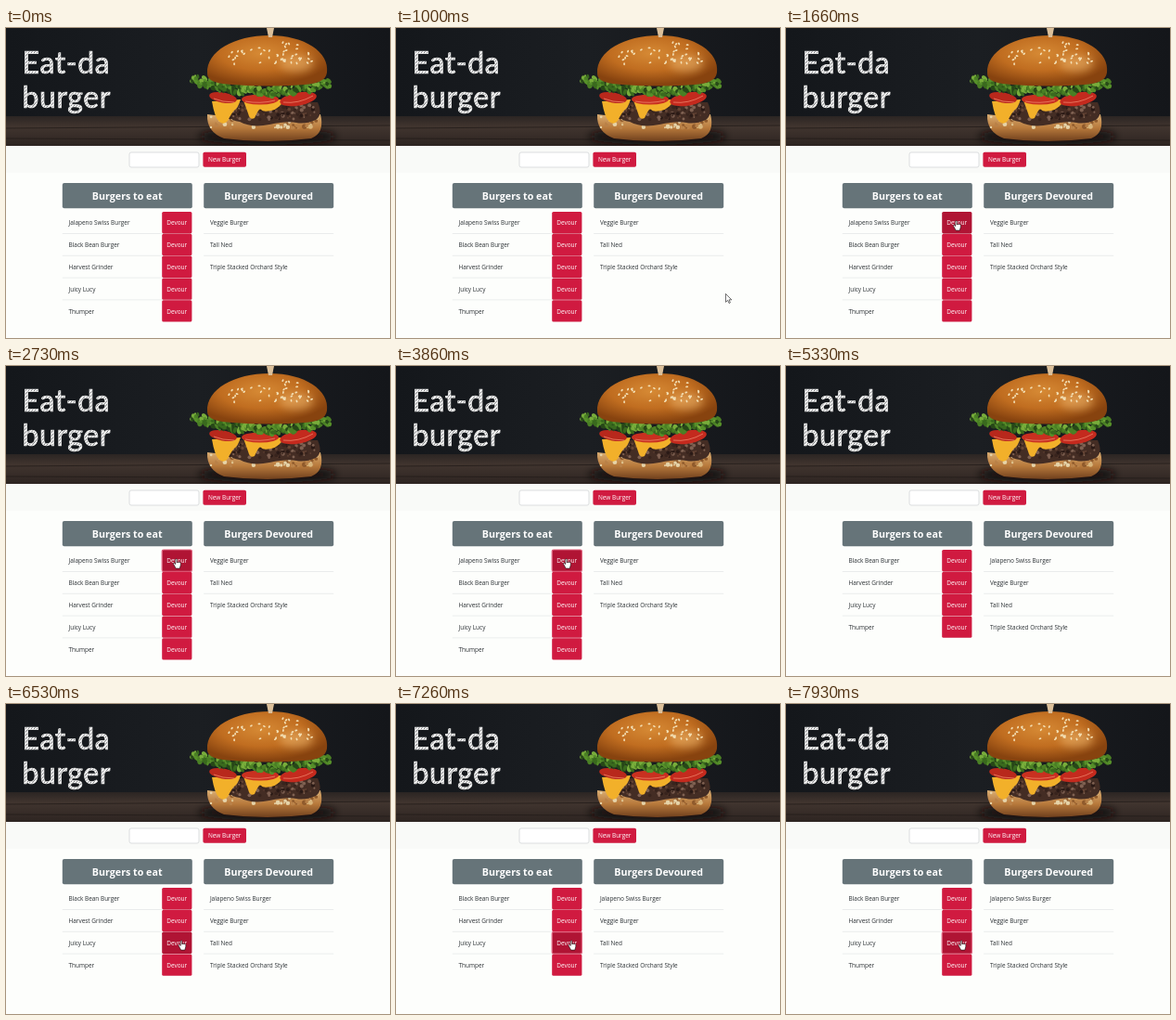
An HTML page for the animation above (8000 ms loop, 414x334 px).

```html
<!DOCTYPE html>
<html lang="en">
<head>
<meta charset="utf-8">
<title>Eat-da burger</title>
<style>
html, body { margin: 0; width: 100%; height: 100%; overflow: hidden; background: #fdfefc; }
svg { display: block; width: 414px; height: 334px; }
text { font: 6.45px "Open Sans", "Noto Sans", sans-serif; fill: #2b3034; }
.light { fill: #fff; text-anchor: middle; }
.head { font-size: 10.7px; font-weight: 700; }
.title { font: 400 32px Lato, sans-serif; fill: url(#hatch); stroke: #f4f4f2; stroke-width: .7; letter-spacing: .6px; }
</style>
</head>
<body>
<svg viewBox="0 0 414 334">
  <defs>
    <linearGradient id="wall"><stop stop-color="#14171b"/><stop offset=".5" stop-color="#1b1e22"/><stop offset="1" stop-color="#14161a"/></linearGradient>
    <linearGradient id="table" x2="0" y2="1"><stop stop-color="#2b2523"/><stop offset=".35" stop-color="#41352f"/><stop offset="1" stop-color="#2d2421"/></linearGradient>
    <radialGradient id="bun" cx=".45" cy=".35" r=".62"><stop stop-color="#d68a35"/><stop offset=".55" stop-color="#c06d20"/><stop offset="1" stop-color="#87430f"/></radialGradient>
    <linearGradient id="base" x2="0" y2="1"><stop stop-color="#d9ad72"/><stop offset=".5" stop-color="#b87a3c"/><stop offset="1" stop-color="#70401d"/></linearGradient>
    <pattern id="hatch" width="2.4" height="2.4" patternUnits="userSpaceOnUse" patternTransform="rotate(40)"><path fill="#4a4c4f" d="M0 0h3v3H0z"/><path fill="#fff" d="M0 0h1.8v3H0z"/></pattern>
    <filter id="soft" x="-30%" y="-60%" width="160%" height="220%"><feGaussianBlur stdDeviation="4"/></filter>
    <clipPath id="photo"><path d="M0 0h414v127H0z"/></clipPath>
  </defs>
  <g clip-path="url(#photo)">
    <path fill="url(#wall)" d="M0 0h414v127H0z"/>
    <path fill="url(#table)" d="M0 95h414v32H0z"/>
    <path stroke="#231c1a" stroke-width=".8" d="M0 108l414-3M0 119l414 2"/>
    <ellipse cx="282" cy="117" rx="74" ry="9" fill="#120d0c" filter="url(#soft)"/>
    <path fill="url(#base)" d="M217 93q60 8 122 0q5 20-10 26q-48 6-94 0q-19-7-18-26z"/>
    <g id="sauce"></g>
    <path fill="#442d24" d="M238 80h98q6 13-2 19-11 5-21 3t-29 2-32-3q-18-2-14-21z"/>
    <g id="crumbs"></g>
    <path fill="#f2b02a" d="M222 79l31-2q-3 9-6 11t-8 12q-4 5-9 1t-8-22zM256 78l44-1q-5 10-14 12t-11-1-7 9q-5 3-7-5z"/>
    <ellipse cx="234" cy="75" rx="15" ry="5.5" fill="#b8281c" transform="rotate(10 234 75)"/>
    <ellipse cx="274" cy="77" rx="20" ry="5.5" fill="#c93020"/>
    <ellipse cx="315" cy="76.5" rx="20" ry="7" fill="#c42a1e" transform="rotate(-10 315 76)"/>
    <path fill="none" stroke="#e5715a" d="M224 76q9 4 22 4M258 79q16 3 32-1M299 80q16 2 32-7"/>
    <g id="lettuce"></g>
    <path fill="url(#bun)" d="M217 49C216 25 246 8 284 8s65 18 62 40c-1 9-11 12-24 13q-38 3-78 0c-15-1-27-3-27-12z"/>
    <ellipse cx="313" cy="38" rx="18" ry="9" fill="#e9b067" opacity=".6" filter="url(#soft)"/>
    <path fill="#dcc09a" d="M281 0h8l-2 10h-4z"/>
    <g id="seeds"></g>
    <text class="title" x="17.5" y="48.5">Eat-da</text>
    <text class="title" x="17.5" y="86">burger</text>
  </g>
  <path fill="#f9faf8" d="M0 127h414v29H0z"/>
  <rect x="133" y="134" width="75" height="16" rx="2" fill="#fff" stroke="#d3d6d8" stroke-width=".8"/>
  <rect x="212.4" y="133.7" width="46.6" height="16" rx="1.8" fill="#d01a40"/>
  <text class="light" x="235.7" y="144.4">New Burger</text>
  <g fill="#667479"><rect x="60.8" y="167" width="140" height="27.3" rx="2"/><rect x="213.2" y="167" width="140" height="27.3" rx="2"/></g>
  <text class="light head" x="130.7" y="185.3">Burgers to eat</text>
  <text class="light head" x="283.2" y="185.3">Burgers Devoured</text>
  <g id="lists"></g>
  <g id="pointer"></g>
</svg>
<script>
const byId = id => document.getElementById(id);
let seed = 7;
const random = () => (seed = seed * 16807 % 2147483647) / 2147483647;
const repeat = (count, make) => Array.from({ length: count }, (_, i) => make(i)).join('');
const pick = list => list[Math.floor(random() * list.length)];

function scatter(count, x, y, w, h, size, colors) {
  return repeat(count, () =>
    `<circle cx="${x + random() * w}" cy="${y + random() * h}" r="${.6 + random() * size}" fill="${pick(colors)}"/>`);
}
byId('sauce').innerHTML = scatter(110, 221, 94, 114, 14, 2, ['#e6d3a8', '#d8b67c', '#b98148', '#8f5a2c']);
byId('crumbs').innerHTML = scatter(100, 240, 83, 94, 16, 1.5, ['#2a1a16', '#654535', '#7f6152', '#38241d']);
byId('lettuce').innerHTML = repeat(150, i => {
  const x = 200 + i;
  const y = 68 - ((x - 282) / 82) ** 2 * 14 + (random() - .5) * 9;
  const color = pick(['#3a6a1e', '#568f2a', '#78ad3b', '#274818', '#4a7f25']);
  return `<ellipse rx="${2 + random() * 2.5}" ry="${1.2 + random() * 1.8}" fill="${color}" transform="translate(${x} ${y}) rotate(${random() * 120})"/>`;
});
byId('seeds').innerHTML = repeat(48, () => {
  const angle = Math.PI * (1 + random()), r = Math.sqrt(random());
  const x = 283 + Math.cos(angle) * 50 * r, y = 39 + Math.sin(angle) * 27 * r;
  return `<ellipse rx="1.5" ry=".9" fill="#f3dfb4" transform="translate(${x} ${y}) rotate(${random() * 180})"/>`;
});

const TOP = 198, ROW = 23.8;
const toEat = ['Jalapeno Swiss Burger', 'Black Bean Burger', 'Harvest Grinder', 'Juicy Lucy', 'Thumper'];
const devoured = ['Veggie Burger', 'Tall Ned', 'Triple Stacked Orchard Style'];
const RELOAD = 5200;

// Pointer legs: start, end, from, to
const legs = [
  [730, 1530, [418, 315], [183.5, 207.5]],
  [4800, 5250, [183.5, 207.5], [418, 250]],
  [5660, 6460, [418, 268], [189, 254.5]],
];

function pointerAt(t) {
  const leg = legs.filter(l => t >= l[0]).pop();
  if (!leg) return [420, 315];
  const [start, end, from, to] = leg;
  const p = Math.min(1, (t - start) / (end - start));
  const eased = p * p * (3 - 2 * p);
  return from.map((v, i) => v + (to[i] - v) * eased);
}

function column(names, x, button) {
  return names.map((name, i) => {
    const y = TOP + i * ROW;
    const line = i < names.length - 1
      ? `<path stroke="#e3e5e6" stroke-width=".7" d="M${x} ${y + ROW - .3}h140"/>` : '';
    return `${line}<text x="${x + 6.7}" y="${y + 14.3}">${name}</text>${button ? button(i, y) : ''}`;
  }).join('');
}

const arrow = '<path fill="#fff" stroke="#111" stroke-width=".6" d="M0 0v9l2.1-2 1.5 3.2 1.3-.6-1.4-3.1h2.8z"/>';
const hand = '<path fill="#fff" stroke="#111" stroke-width=".6" d="M1.3 1v5L.2 5c-.9-.5-1.5.4-1 1l2.4 4.6h4.2l1-3.7V4.7c-.2-.9-1.2-.9-1.4-.2-.2-.8-1.1-.8-1.3-.1-.2-.7-1.1-.7-1.3 0V1C2.8 0 1.3 0 1.3 1z"/>';

function draw(t) {
  const [px, py] = pointerAt(t);
  const reloaded = t >= RELOAD;
  const focused = t >= 6800 ? 2 : t >= 2000 && !reloaded ? 0 : -1;
  let hovering = false;

  const button = (i, y) => {
    const over = px > 168 && px < 201 && py > y && py < y + ROW;
    hovering = hovering || over;
    const ring = i === focused ? 'stroke="#df6680" stroke-width="1.2"' : '';
    return `<rect x="168.2" y="${y}" width="32.2" height="23.4" rx="1.6" fill="${over ? '#b01434' : '#d01a40'}" ${ring}/>` +
      `<text class="light" x="184.2" y="${y + 14.3}">Devour</text>`;
  };
  byId('lists').innerHTML =
    column(reloaded ? toEat.slice(1) : toEat, 60.8, button) +
    column(reloaded ? [toEat[0], ...devoured] : devoured, 213.2, null);

  const pointer = byId('pointer');
  pointer.innerHTML = hovering ? hand : arrow;
  pointer.setAttribute('transform', `translate(${px - (hovering ? 2 : 0)} ${py})`);
}

function tick() {
  draw(performance.now() % 8000);
  requestAnimationFrame(tick);
}
tick();
</script>
</body>
</html>
```
